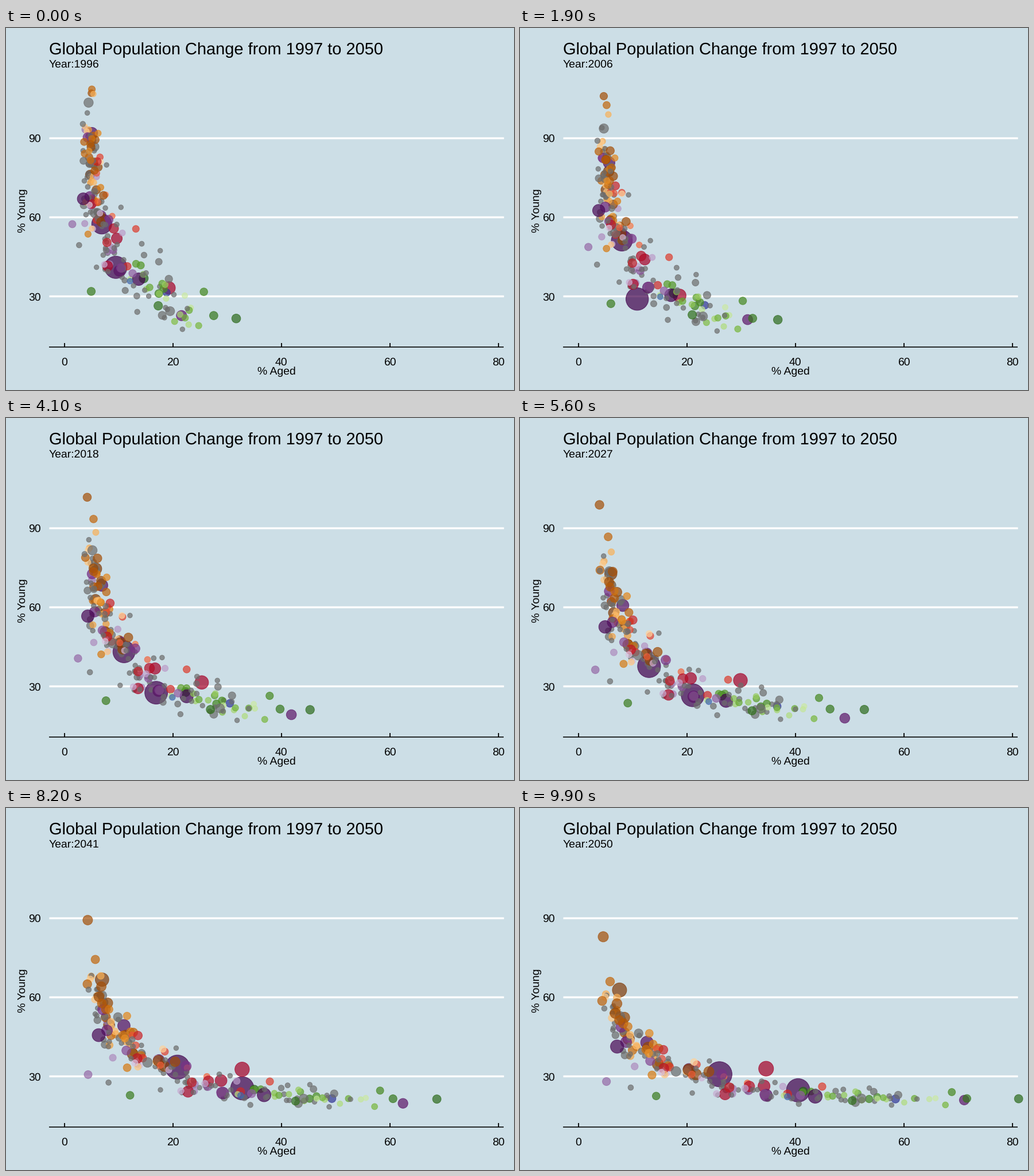
A matplotlib script for the animation above (10000 ms loop, 885 by 632 pixels).

```python
import matplotlib.pyplot as plt
import numpy as np
from matplotlib.animation import FuncAnimation
from matplotlib.colors import to_rgba

W, H, DPI = 885, 632, 72
FRAMES, STEP = 100, 100
FIRST, LAST = 1996, 2050
ALPHA = 0.7
T = np.linspace(0, 1, FRAMES)[:, None]

plt.rcParams["font.family"] = "Liberation Sans"
plt.rcParams["text.hinting"] = "none"


def shades(name, start, stop):
    """Colour by weight: 1 gives the dark start of the ramp, 0 its pale stop."""
    ramp = plt.get_cmap(name)
    return lambda w: to_rgba(ramp(start + (stop - start) * (1 - w)), ALPHA)


AFRICA = shades("PuOr", 0.0, 0.37)
ASIA = shades("PRGn", 0.0, 0.36)
EUROPE = shades("PiYG", 1.0, 0.66)
AMERICAS = shades("RdYlBu", 0.0, 0.22)
OCEANIA = shades("RdYlBu", 1.0, 0.92)


def grey(w):
    return to_rgba("#6c6c6c", ALPHA)


def px(aged):
    return 101.5 + 9.4575 * aged


def py(young):
    return 606.7 - 4.607 * young


# Largest populations: colour, first and last radius, key points (aged, young)
KEY_T = [0, 0.19, 0.57, 1]
GIANTS = [
    (ASIA(1), 20, 21, [(9.5, 41), (10.8, 29), (21.2, 26.6), (40.5, 24.7)]),
    (ASIA(1), 18, 22.5, [(6.9, 57.4), (8, 51.2), (13.1, 37.5), (26, 30.8)]),
    (AMERICAS(1), 11.5, 13.5, [(19.3, 33.2), (18.6, 30.3), (30, 32.3), (34.6, 32.9)]),
    (ASIA(0.85), 9.5, 9, [(21.6, 22.7), (31.1, 21.2), (49.3, 17.9), (71.1, 21)]),
    (AFRICA(0.8), 6.5, 9.5, [(5, 107), (4.7, 105.9), (3.9, 98.7), (4.6, 82.9)]),
    (AFRICA(1), 9, 13, [(5.3, 80.5), (5.6, 77.4), (6, 72.6), (7.6, 62.7)]),
]

# Shades, count, rank range, radius range, growth of radius
GROUPS = [
    (AFRICA, 42, 0.0, 0.45, 5.2, 8.5, 1.25),
    (grey, 86, 0.04, 0.97, 4.7, 9, 1.0),
    (ASIA, 24, 0.15, 0.8, 5.5, 11.5, 1.1),
    (AMERICAS, 16, 0.25, 0.75, 5.5, 10, 1.1),
    (EUROPE, 26, 0.78, 1.0, 5.5, 8.5, 0.95),
    (OCEANIA, 2, 0.76, 0.84, 5.5, 7, 1.1),
]


def typical(rank):
    """Share of aged and young for a development rank from 0 to 1, at all times."""
    aged = 4.8 + 0.7 * T + (20 + 15 * T + 22 * T**2) * rank ** (1.6 + 1.6 * (1 - T) ** 2)
    young = 22 + (75 - 33 * T**1.3) * (1 - rank) ** (1.05 + 1.65 * T)
    return aged, young


def crowd():
    rng = np.random.default_rng(14)
    rank, radius, growth, colors = [], [], [], []
    for tint, n, lo, hi, small, big, grow in GROUPS:
        weight = rng.permutation(np.linspace(0, 1, n))
        rank.extend(lo + (hi - lo) * (np.arange(n) + rng.random(n)) / n)
        radius.extend(small + (big - small) * weight ** (6 if tint is grey else 2))
        growth.extend([grow] * n)
        colors.extend(tint(w) for w in weight)

    n = len(rank)
    order = rng.permutation(n)
    rank, radius, growth = (np.array(v)[order] for v in (rank, radius, growth))
    dx, dy = rng.normal(size=(2, n)).clip(-2, 2)
    # A few young-migrant states stay far left of the curve.
    lag = np.where(rng.random(n) < 0.035, rng.uniform(0.12, 0.45, n), 1)

    aged, young = typical(rank)
    aged = aged * lag * np.exp(0.17 * dx)
    young = young * np.exp((0.1 + 0.08 * rank) * (1 - 0.6 * T) * dy)
    return aged, young, radius * (1 + (growth - 1) * T), [colors[k] for k in order]


def giants():
    colors, first, last, keys = zip(*GIANTS)
    paths = np.array([[np.interp(T[:, 0], KEY_T, axis) for axis in zip(*pts)] for pts in keys])
    radius = np.array(first) * (1 - T) + np.array(last) * T
    return paths[:, 0].T, paths[:, 1].T, radius, list(colors)


aged, young, radius, colors = (
    a + b if isinstance(a, list) else np.hstack([a, b]) for a, b in zip(giants(), crowd()))
X, Y = px(aged), py(young)

fig = plt.figure(figsize=(W / DPI, H / DPI), dpi=DPI, facecolor="#ccdee6")
ax = fig.add_axes([0, 0, 1, 1])
ax.set_xlim(0, W)
ax.set_ylim(H, 0)
ax.axis("off")


def line(x, y, color, width):
    ax.plot(x, y, color=color, lw=width, solid_capstyle="butt", zorder=1)


def label(x, y, text, size=19.4, **kw):
    return ax.text(x, y, text, fontsize=size, color="black", va="baseline", zorder=4, **kw)


for v in (30, 60, 90):
    line([75, 867], [py(v)] * 2, "white", 3.4)
    label(61, py(v) + 7, str(v), ha="right")
line([75, 867], [557, 557], "black", 1.6)
for v in range(0, 81, 20):
    line([px(v)] * 2, [550, 557], "black", 1.8)
    label(px(v), 589, str(v), ha="center")

label(75, 45.5, "Global Population Change from 1997 to 2050", 29)
label(471, 605, "% Aged", ha="center")
label(34, 319, "% Young", ha="center", rotation=90, rotation_mode="anchor")
year = label(75, 69, "")
dots = ax.scatter(X[0], Y[0], s=1, c=colors, edgecolors=colors, linewidths=1, zorder=3)


def update(i):
    dots.set_offsets(np.column_stack([X[i], Y[i]]))
    dots.set_sizes((2 * radius[i] - 1) ** 2)
    year.set_text(f"Year:{round(FIRST + (LAST - FIRST) * i / (FRAMES - 1))}")
    return dots, year


anim = FuncAnimation(fig, update, frames=FRAMES, interval=STEP, repeat=True,
                     repeat_delay=0, init_func=lambda: update(0))
plt.show()
```
